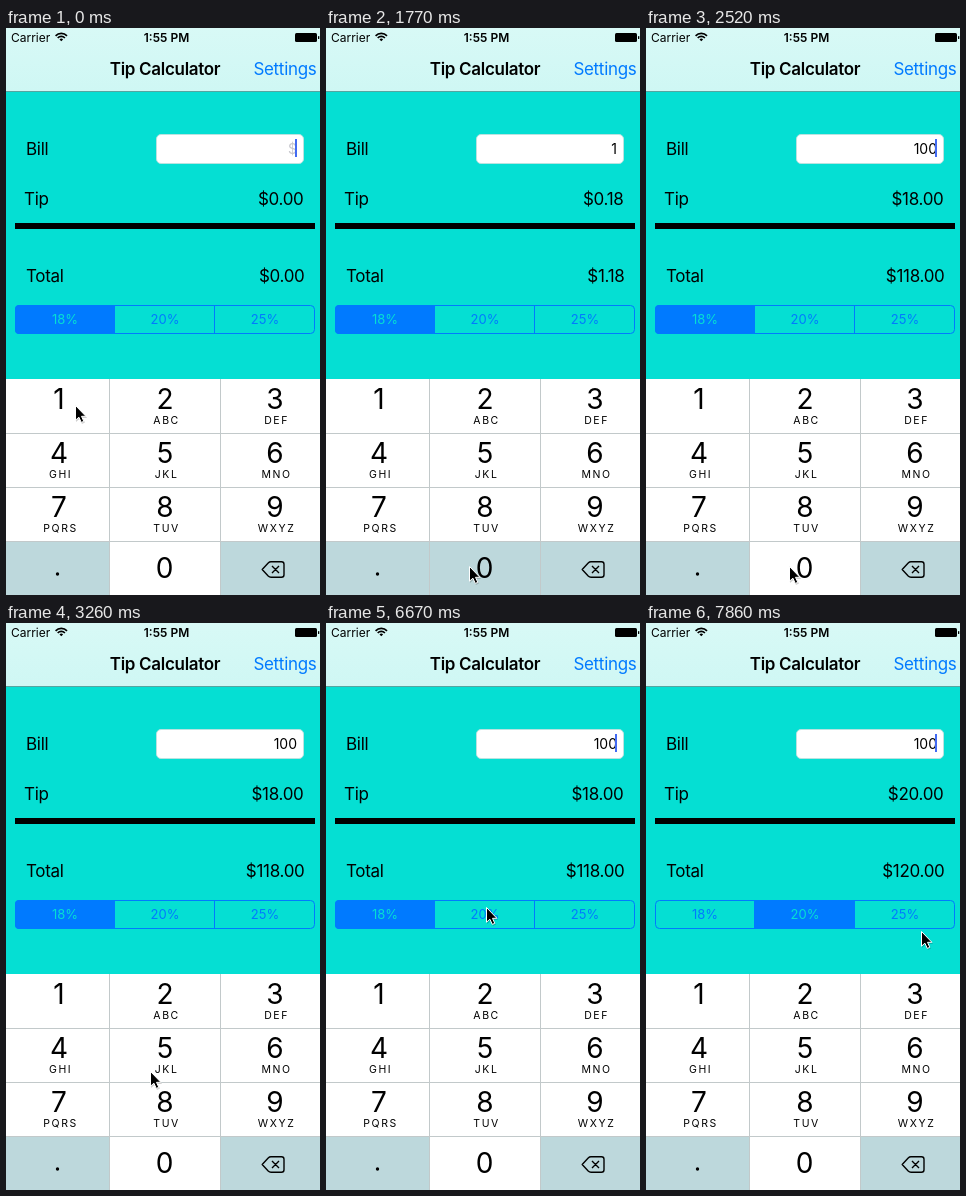
Write an HTML page that moves like this. It is 314 px wide and 567 px high and loops after 8 s.

```html
<!DOCTYPE html>
<html lang="en">
<head>
<meta charset="utf-8">
<title>Tip Calculator</title>
<style>
  html, body { margin: 0; width: 100%; height: 100%; overflow: hidden; }
  svg { display: block; width: 314px; height: 567px; background: #05dfd3; }
  text { font: 17px Inter, "Liberation Sans", sans-serif; letter-spacing: -.3px; }
  .status { font-size: 12px; letter-spacing: 0; }
  .bold { font-weight: 600; }
  .field { font-size: 14px; letter-spacing: 0; }
  .seg { font-size: 13px; letter-spacing: 0; }
  .digit { font-size: 28px; letter-spacing: 0; }
  .letters { font-size: 10.5px; letter-spacing: 1.6px; }
  .mid { text-anchor: middle; }
  .end { text-anchor: end; }
</style>
</head>
<body>
<svg viewBox="0 0 314 567">
  <defs>
    <linearGradient id="bar" x2="0" y2="1">
      <stop stop-color="#d8f9f6"/><stop offset="1" stop-color="#cff7f4"/>
    </linearGradient>
  </defs>

  <rect width="314" height="63" fill="url(#bar)"/>
  <rect y="63" width="314" height="1" fill="#55a5a0"/>
  <text class="status" x="5" y="13.5">Carrier</text>
  <path d="M49.6 7.8a8 8 0 0 1 11.4 0M51.7 10a5 5 0 0 1 7.2 0" fill="none" stroke="#000" stroke-width="1.7"/>
  <path d="M55.3 13.3l-1.8-1.9a2.5 2.5 0 0 1 3.6 0z"/>
  <text class="status bold mid" x="160.5" y="13.5">1:55 PM</text>
  <rect x="289" y="5" width="22" height="9" rx="1.5"/>
  <rect x="312" y="8" width="1.3" height="3" rx=".6"/>
  <text class="bold mid" x="159" y="47">Tip Calculator</text>
  <text class="end" x="310.5" y="47" fill="#007aff">Settings</text>

  <text x="20" y="126.5">Bill</text>
  <rect x="150.5" y="106.5" width="147" height="29" rx="4.5" fill="#fff" stroke="#b9e3e0"/>
  <text class="field end" id="bill" x="291" y="125.5"></text>
  <rect id="caret" x="289" y="111" width="2" height="18" fill="#426bf2"/>
  <text x="18" y="176.5">Tip</text>
  <text class="end" id="tip" x="297.5" y="176.5"></text>
  <rect x="9" y="195" width="300" height="6"/>
  <text x="20" y="253.5">Total</text>
  <text class="end" id="total" x="298.5" y="253.5"></text>

  <g id="segments"></g>
  <path d="M108.5 278v27M208.5 278v27" stroke="#007aff"/>
  <rect x="9.5" y="277.5" width="299" height="28" rx="4" fill="none" stroke="#007aff"/>

  <rect y="351" width="314" height="216" fill="#fff"/>
  <path d="M0 513.5h103.5V567H0zM214.5 513.5H314V567h-99.5z" fill="#bdd8dc"/>
  <rect id="zero" x="104" y="514" width="110" height="53" fill="#bdd8dc"/>
  <path d="M0 405.5h314M0 459.5h314M0 513.5h314M103.5 351v216M214.5 351v216" stroke="#c2c9ca"/>
  <g id="keys"></g>
  <circle cx="51.5" cy="546" r="1.7"/>
  <path d="M256.2 541.5l6-6.5q1.200-1.200 2.800-1.200h10.500q2.500 0 2.500 2.500v10.400q0 2.500-2.500 2.500H265q-1.600 0-2.800-1.200zM266 538l7 7M273 538l-7 7"
    fill="none" stroke="#000" stroke-width="1.4" stroke-linejoin="round"/>

  <g id="cursor">
    <path d="M1 2v15l3.500-3 2.500 5 3-1.500-2.300-4.500h4.500z" opacity=".18"/>
    <path d="M.5.500v14.700l3.400-3 2.400 5.200 2.500-1.100-2.300-5h4.400z" stroke="#fff"/>
  </g>
</svg>
<script>
const LOOP = 8000, STEPS = 54, STEP = LOOP / STEPS;
const BLUE = '#007aff', TEAL = '#05dfd3';
const $ = id => document.getElementById(id);
const label = (cls, x, y, str) => `<text class="${cls} mid" x="${x}" y="${y}">${str}</text>`;

// Keypad: three columns, 54px rows
$('keys').innerHTML = ',ABC,DEF,GHI,JKL,MNO,PQRS,TUV,WXYZ'.split(',').map((str, i) => {
  const x = 53 + 108 * (i % 3), y = 381 + 54 * Math.floor(i / 3);
  const cx = x - (i % 3 == 1 ? 2 : 0);
  return label('digit', cx, y, i + 1) + label('letters', cx + 1.6, y + 15, str);
}).join('') + label('digit', 158.5, 550, 0);

$('segments').innerHTML = ['18%', '20%', '25%'].map((str, i) =>
  `<rect x="${9 + 99.5 * i}" y="277" width="100" height="29" rx="${i == 1 ? 0 : 4}" fill="${BLUE}"/>` +
  label('seg', 59 + 100 * i, 296.3, str)).join('');
const segRects = document.querySelectorAll('#segments rect');
const segTexts = document.querySelectorAll('#segments text');

// Pointer moves: first step, last step, x, y
const moves = [
  [0, 0, 69, 377], [2, 8, 121, 514], [8, 11, 143, 538], [17, 19, 76, 478], [19, 22, 144, 448],
  [24, 25, 184, 348], [42, 45, 160, 284], [49, 53, 275, 308]
];
// Steps at which the bill gains a digit: '', 1, 10, 100
const edits = [0, 4, 13, 16];
const SELECT = 49;

const money = v => '$' + v.toFixed(2);

function pointer(n) {
  let x = 0, y = 0;
  for (const [from, to, toX, toY] of moves) {
    const k = to <= n ? 1 : Math.max(0, (n - from) / (to - from));
    x += (toX - x) * k;
    y += (toY - y) * k;
  }
  return [Math.round(x), Math.round(y)];
}

// Solid just after an edit, then a steady blink with a half-faded step on each side
function caretOpacity(idle) {
  const period = 6.7;
  if (idle < 5) return 1;
  const away = Math.abs((idle - 3.7) % period - period / 2);
  return away < 1.1 ? 0 : away < 1.8 ? .5 : 1;
}

function draw(n) {
  const digits = edits.filter(e => e <= n).length - 1;
  const idle = n - edits[digits];
  const bill = '100'.slice(0, digits);
  const chosen = n < SELECT ? 0 : 1;
  const tip = bill * (chosen ? .2 : .18);
  $('bill').textContent = bill || '$';
  $('bill').setAttribute('fill', bill ? '#000' : '#c7c7cd');
  $('tip').textContent = money(tip);
  $('total').textContent = money(+bill + tip);
  $('caret').setAttribute('opacity', caretOpacity(idle));
  // The zero key darkens one step before its digit appears
  $('zero').setAttribute('opacity', edits.slice(2).some(e => n == e || n == e - 1) ? 1 : 0);
  segRects.forEach((r, i) => {
    const pressed = i == 1 && n == SELECT - 1;
    r.setAttribute('opacity', i == chosen ? 1 : pressed ? .15 : 0);
    segTexts[i].setAttribute('fill', i == chosen ? TEAL : BLUE);
  });
  $('cursor').setAttribute('transform', `translate(${pointer(n)})`);
}

const start = performance.now();
let shown = -1;
function tick() {
  const t = (performance.now() - start) % LOOP;
  const n = Math.min(STEPS - 1, Math.floor((t + 8) / STEP));
  if (n != shown) draw(shown = n);
  requestAnimationFrame(tick);
}
tick();
</script>
</body>
</html>
```
